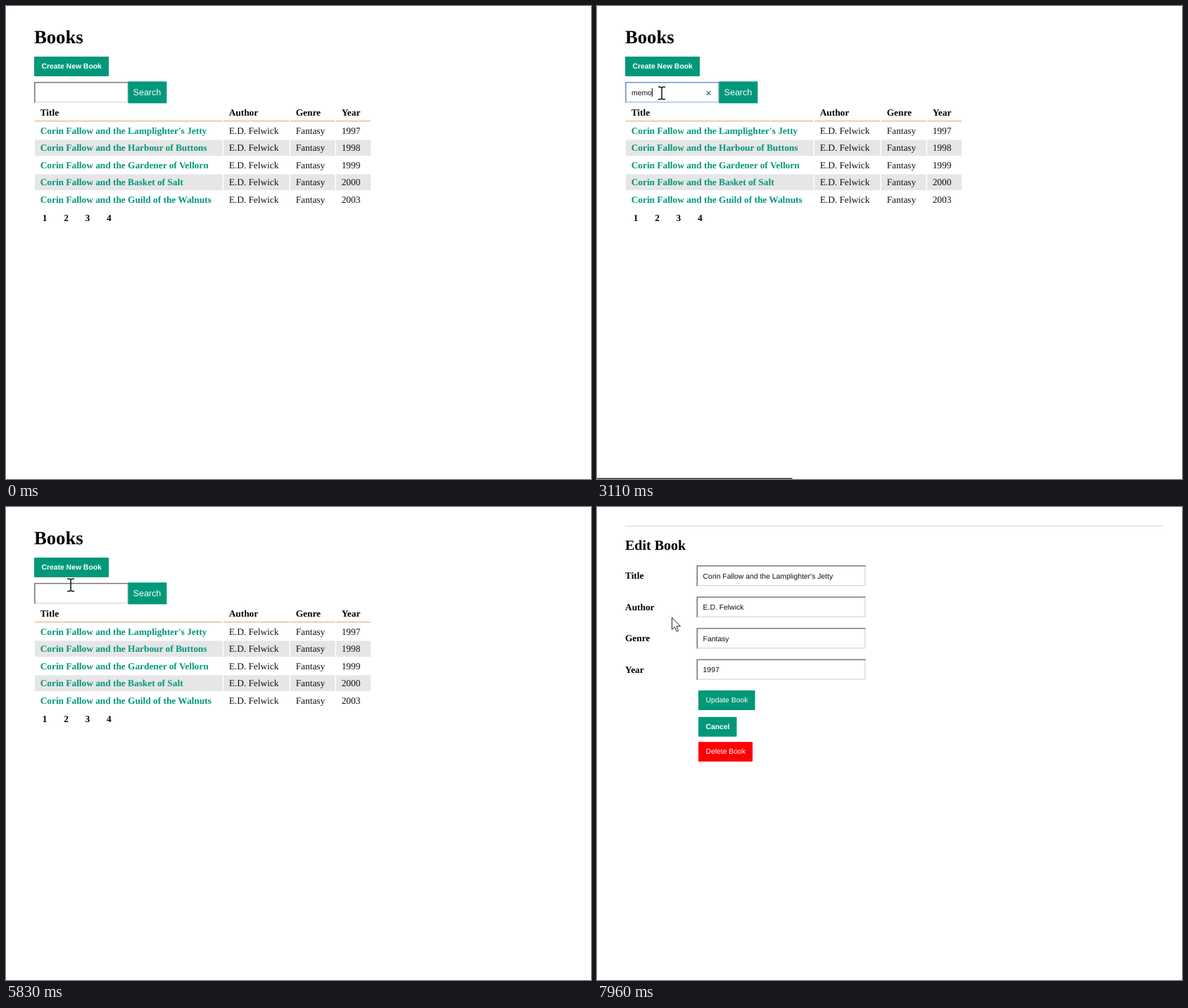
Write an HTML page that moves like this. It is 831 px wide and 673 px high and loops after 8000 ms.

```html
<!DOCTYPE html>
<html lang="en">
<head>
<meta charset="utf-8">
<title>Books</title>
<style>
html, body { margin: 0; width: 100%; height: 100%; overflow: hidden; background: #fff; }
svg { display: block; width: 831px; height: 673px; }
text { font: 13.33px "Liberation Serif", serif; fill: #111; text-rendering: geometricPrecision; white-space: pre; }
.b { font-weight: 700; fill: #000; }
.h1 { font-size: 26.67px; }
.h2 { font-size: 20px; }
.ui { font: 10.4px "Liberation Sans", sans-serif; }
.btn { fill: #fff; }
.bold { font-weight: 700; }
.big { font-size: 12.5px; }
.opt { font: 9.3px "Open Sans", sans-serif; }
#menu rect { fill: #fff; filter: drop-shadow(0 1px 1.5px rgba(0,0,0,.42)); }
</style>
</head>
<body>
<svg id="stage" viewBox="0 0 831 673"></svg>
<script>
const LOOP = 8000, STEP = 70;
const ROW = 24.45, FORM_ROW = 44.5, OPTION = 26.67;
const GREEN = [0, 152, 121], LIGHT = [0, 178, 142], BLACK = [0, 0, 0];
const DARK_EDGE = '#7b7a74', PALE_EDGE = '#dedede';

const text = (x, y, s, cls = '', id = '') => `<text x="${x}" y="${y}" class="${cls}" id="${id}">${s}</text>`;
const rect = (x, y, w, h, fill, extra = '') => `<rect x="${x}" y="${y}" width="${w}" height="${h}" fill="${fill}" ${extra}/>`;
const group = (id, ...parts) => `<g id="${id}">${parts.join('')}</g>`;
const blend = (a, b, k) => `rgb(${a.map((v, i) => Math.round(v + (b[i] - v) * k))})`;
const TEAL = blend(GREEN, GREEN, 0);

function button(x, y, w, label, cls = 'bold', id = '', fill = TEAL) {
  return rect(x, y, w, 28, fill, `rx="1" id="${id}"`) + text(x + 10.4, y + 17, label, 'ui btn ' + cls);
}

function field(x, y, w, id = '') {
  const l = x + .8, t = y + .8, r = x + w - .8, b = y + 28.7;
  const edge = (d, stroke, name) => `<path d="${d}" fill="none" stroke="${stroke}" stroke-width="1.6" id="${id}${name}"/>`;
  return edge(`M${l} ${b}H${r}V${t}`, PALE_EDGE, 'Pale') +
    edge(`M${l} ${b + .8}V${t}H${r + .8}`, DARK_EDGE, 'Dark');
}

// edges: left side of each cell, then the end of the table
function table(edges, rows, id) {
  return ['Title', 'Author', 'Genre', 'Year'].map((name, c) => {
    const l = edges[c], w = edges[c + 1] - l - 1.5, x = l + 7.7;
    return text(x, 156, name, 'b') + rect(l, 163, w, 1.4, '#dfbc9e') +
      rows.map((row, i) => (i % 2 ? rect(l, 166 + i * ROW, w, 22.7, '#e6e6e6') : '') +
        text(x, 182 + i * ROW, row[c], c ? '' : 'b', c ? '' : id + i)).join('');
  }).join('');
}

const HERO = 'Corin Fallow and the ', WRITER = 'E.D. Felwick';
const books = [
  ["Lamplighter's Jetty", 1997], ['Harbour of Buttons', 1998], ['Gardener of Vellorn', 1999],
  ['Basket of Salt', 2000], ['Guild of the Walnuts', 2003]
].map(([name, year]) => [HERO + name, WRITER, 'Fantasy', year]);
const found = [['Memo', 'Tess Elvend', 'Classic', 1815]];

document.getElementById('stage').innerHTML =
  group('top',
    text(40, 53, 'Books', 'b h1'),
    button(40, 72, 106, 'Create New Book', 'bold', 'create'),
    field(40, 108, 133.5, 'search'),
    rect(173.3, 107.4, 55, 31, TEAL),
    text(180.6, 127, 'Search', 'ui btn big')) +
  group('list',
    table([41, 309, 404, 469, 519.5], books, 'row'),
    ...[1, 2, 3, 4].map(n => text(21.4 + n * 30.4, 306, n, 'b'))) +
  group('found',
    table([41, 103, 190.8, 253.6, 304], found, 'hit'),
    button(40, 200, 45, 'Back', 'bold', 'back')) +
  group('edit',
    rect(40, 26.6, 764, 1.4, '#e0e0e0'),
    text(40, 61, 'Edit Book', 'b h2'),
    ...['Title', 'Author', 'Genre', 'Year'].map((label, i) => text(40, 102 + i * FORM_ROW, label, 'b') +
      field(141.5, 83 + i * FORM_ROW, 240) + text(150.6, 101.6 + i * FORM_ROW, books[0][i], 'ui')),
    button(144, 261, 80.5, 'Update Book', ''),
    button(144, 298.7, 54.5, 'Cancel'),
    button(144, 334.2, 77, 'Delete Book', '', '', '#f00')) +
  group('menu') +
  text(49, 126.7, '', 'ui', 'typed') +
  rect(49, 117, 1, 12, '#000', 'id="caret"') +
  '<path id="clear" d="M155.7 121.2l5.6 5.6m0-5.6l-5.6 5.6" stroke="#4c7f95" stroke-width="1.6"/>' +
  rect(0, 671.6, 0, 1.4, '#333', 'id="status"') +
  '<path id="pointer" stroke-linejoin="round"/>';

const el = id => document.getElementById(id);
const show = (id, on) => { el(id).style.display = on ? '' : 'none'; };

const shapes = {
  arrow: ['M.5.5V17.3L4.4 13.7 7.1 20 9.6 18.9 6.9 12.7H12.4Z', '#fff', '#222', 1],
  hand: ['M-2 1.5C-2-.6 1.6-.6 1.6 1.5V8C2 6.2 5 6.4 5 8.4 5.4 7 8 7.2 8 9.2 8.8 8.2 10.4 8.7 10.4 10.6V15' +
    'C10.4 19 8.5 22 4.5 22H1.5C-1 22-2.5 20-4 17.5L-6.8 13.6C-8 11.5-5.2 10-3.8 12L-2 14Z', '#fff', '#222', 1],
  text: ['M-5-8.7H-1.5L0-7.8 1.5-8.7H5M0-7.8V7.8M-5 8.7H-1.5L0 7.8 1.5 8.7H5', 'none', '#111', 1.5]
};

// Each move bends from the last resting place past a control point
const moves = [
  { at: 260, steps: 12, bend: [92, 264], to: [92, 124] },
  { at: 3970, steps: 12, bend: [62, 260], to: [74, 180] },
  { at: 5070, steps: 6, bend: [76, 195], to: [80, 214] },
  { at: 5620, steps: 12, bend: [100, -6], to: [108, 167] },
  { at: 6460, steps: 3, bend: [108, 174], to: [108.5, 177] },
  { at: 7470, steps: 8, bend: [360, -86], to: [106, 157] }
];

function pointerAt(t) {
  const k = moves.findLastIndex(m => m.at <= t);
  if (k < 0) return null;
  const { at, steps, bend, to } = moves[k];
  const from = k ? moves[k - 1].to : [640, 645];
  const u = Math.min(Math.floor((t - at) / STEP) + 1, steps) / steps, v = 1 - u;
  return from.map((a, i) => a * v * v + 2 * bend[i] * u * v + to[i] * u * u);
}

const sceneAt = t => t >= 6860 ? 'edit' : t >= 3240 && t < 5690 ? 'found' : 'list';

function hoverAt(t) {
  const p = pointerAt(t), scene = sceneAt(t);
  if (!p) return '';
  const within = (l, top, w, h) => p[0] >= l && p[0] <= l + w && p[1] >= top && p[1] <= top + h;
  if (scene === 'edit') {
    return [0, 1, 2, 3].some(i => within(141.5, 83 + i * FORM_ROW, 240, 29.5)) ? 'field' : '';
  }
  if (within(40, 72, 106, 28)) return 'create';
  if (within(40, 108, 133, 30)) return 'field';
  if (scene === 'found') {
    return within(49, 170, 38, 15.5) ? 'hit0' : within(40, 200, 45, 28) ? 'back' : '';
  }
  const row = books.findIndex((_, i) => within(49, 170 + i * ROW, 240, 15.5));
  return row < 0 ? '' : 'row' + row;
}

// Colours fade with the share of recent time spent hovering
function heat(id, t) {
  let n = 0;
  for (let k = 0; k < 5; k++) n += hoverAt(t - k * 20) === id;
  return n / 5;
}

// The status strip appears once a link has been hovered for a moment
function statusWidth(t) {
  if (t >= 3110 && t < 3500) return 277.5;
  const id = hoverAt(t);
  if (id !== hoverAt(t - 120)) return 0;
  return id === 'back' ? 91.5 : /^(row|hit)/.test(id) ? 96.5 : 0;
}

const WORD = 'memo';
const recent = ['cat', 'beach', 'react', 'corin', 'villa', 'andy'];
const guesses = [WORD, 'meadow', 'maple'];

function typedAt(t) {
  if (t < 2190) return '';
  return WORD.slice(0, 1 + Math.max(0, Math.floor((t - 2260) / 130)));
}

function drawMenu(t, word) {
  const on = t >= 1230 && word !== WORD;
  const items = !on ? [] : word ? guesses.slice(0, 4 - word.length) : recent;
  el('menu').innerHTML = on
    ? rect(40, 139, 142.5, 12 + items.length * OPTION, '#fff', 'rx="1"') +
      items.map((w, i) => text(49, 162 + i * OPTION, w, 'opt')).join('')
    : '';
  el('menu').style.opacity = t < 1300 ? .5 : 1;
}

function drawSearch(t) {
  const focus = t >= 1160 && t < 3240, sent = t >= 2980;
  const edge = (plain, blue) => !focus ? plain : sent ? blue : '#5e646b';
  el('searchDark').setAttribute('stroke', edge(DARK_EDGE, '#7391cb'));
  el('searchPale').setAttribute('stroke', edge(PALE_EDGE, '#a5c3e6'));

  const word = focus ? typedAt(t) : '';
  el('typed').textContent = word;
  show('clear', word);
  show('caret', focus && (t < 1790 || word));
  el('caret').setAttribute('x', 49 + (word ? el('typed').getComputedTextLength() : 0));
  drawMenu(focus ? t : 0, word);
}

function drawPointer(t) {
  const p = pointerAt(t), over = hoverAt(t);
  show('pointer', p);
  if (!p) return;
  const [d, fill, stroke, width] = shapes[over === 'field' ? 'text' : over ? 'hand' : 'arrow'];
  const attrs = { d, fill, stroke, 'stroke-width': width, transform: `translate(${p})` };
  for (const name in attrs) el('pointer').setAttribute(name, attrs[name]);
}

function draw(t) {
  const scene = sceneAt(t);
  ['list', 'found', 'edit'].forEach(s => show(s, s === scene));
  show('top', scene !== 'edit');
  drawSearch(t);

  const links = [...books.map((_, i) => 'row' + i), 'hit0'];
  links.forEach(id => { el(id).style.fill = blend(GREEN, BLACK, heat(id, t)); });
  ['create', 'back'].forEach(id => { el(id).style.fill = blend(GREEN, LIGHT, heat(id, t)); });

  el('status').setAttribute('width', statusWidth(t));
  drawPointer(t);
}

const begin = performance.now();
function tick() {
  draw((performance.now() - begin) % LOOP);
  requestAnimationFrame(tick);
}
tick();
</script>
</body>
</html>
```
